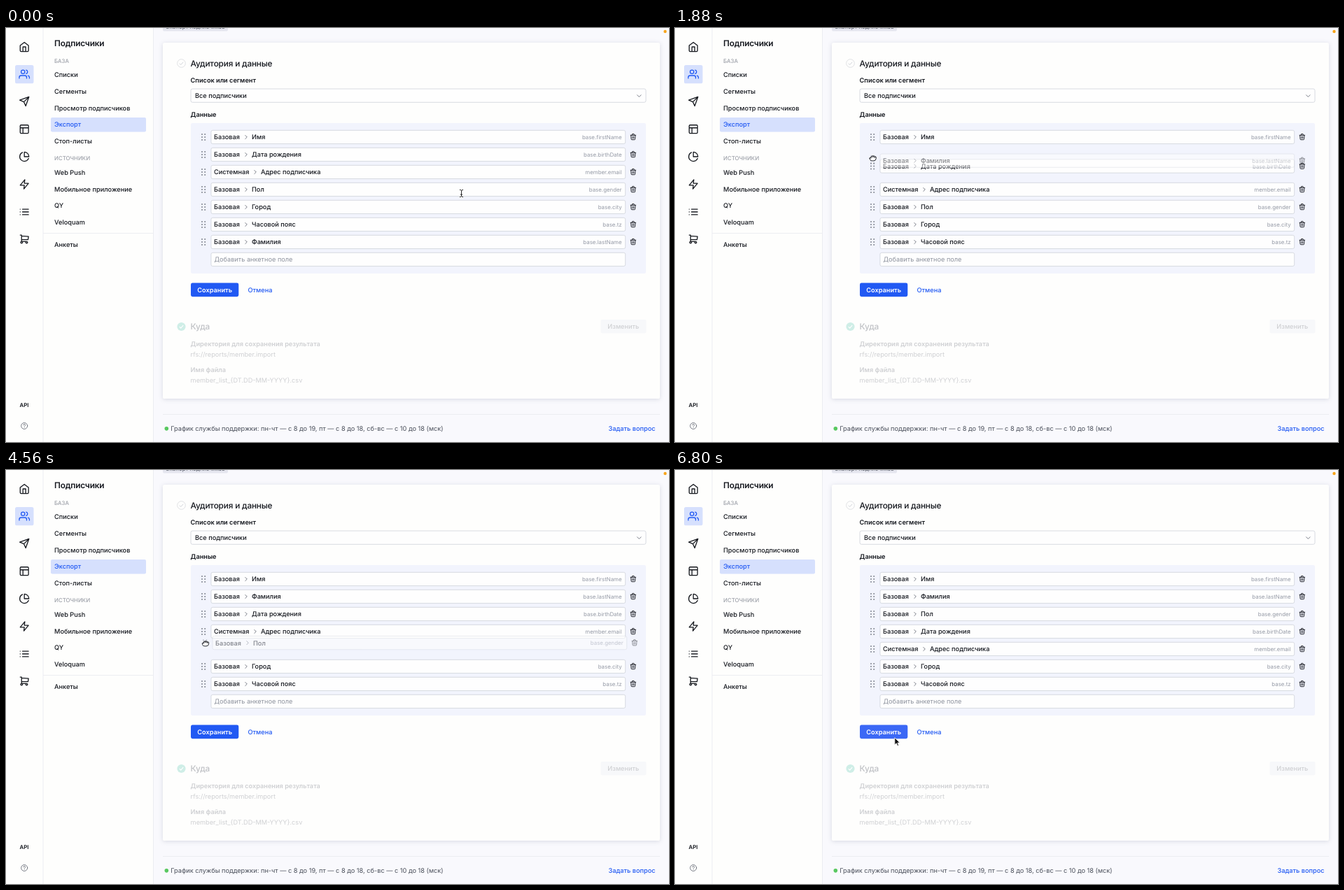
Write an HTML page that moves like this. It is 947 by 592 pixels and loops after 6.84 s.

```html
<!DOCTYPE html>
<html lang="ru">
<head>
<meta charset="utf-8">
<title>Экспорт</title>
<style>
  html, body { margin: 0; width: 100%; height: 100%; overflow: hidden; background: #f9f9fd; }
  svg { display: block; }
  text { font: 450 9.2px Inter, "Noto Sans", sans-serif; fill: #14171e; text-rendering: geometricPrecision; white-space: pre; }
  .h { font-size: 11.84px; font-weight: 500; letter-spacing: -.014em; }
  .title { font-size: 11.84px; font-weight: 600; letter-spacing: -.014em; }
  .b { font-weight: 600; }
  .r { font-weight: 400; }
  .s { font-size: 7.89px; font-weight: 400; fill: #8c909a; }
  .tag { font-size: 7.89px; font-weight: 400; fill: #959aa6; text-anchor: end; }
  .link { fill: #2159f3; }
  .white { fill: #fff; }
  .hint { font-weight: 400; fill: #8f949f; }
  .line { stroke: #e9eaef; stroke-width: .8; }
  .box { fill: #fefefe; stroke: #cfd2da; stroke-width: .8; }
  .icon { fill: none; stroke: #16191f; stroke-width: 2; stroke-linecap: round; stroke-linejoin: round; }
  .thin { fill: none; stroke: #6a6f7a; stroke-width: .9; stroke-linecap: round; stroke-linejoin: round; }
  .dim text { fill: #cfd0d3; }
  .dim .h { fill: #bfc1c5; }
  #card { filter: drop-shadow(0 1px 3px rgba(40, 50, 90, .16)); }
</style>
</head>
<body>
<svg width="947" height="592" viewBox="0 0 947 592">
  <rect width="947" height="592" fill="#f9f9fd"/>
  <rect width="210.5" height="592" fill="#fefefd"/>
  <path class="line" d="M53 0V592M210.5 0V592M53 293.5H210M224 552.5H934"/>

  <rect x="13" y="53" width="26.5" height="26.3" rx="2.6" fill="#d6e0fd"/>
  <g id="menu"></g>
  <text class="b" x="26" y="541.9" text-anchor="middle" style="font-size:7.89px">API</text>
  <circle class="thin" cx="26.2" cy="569" r="4.5"/>
  <path class="thin" d="M24.9 567.8a1.35 1.35 0 1 1 2 1.1q-.7.4-.7 1M26.2 571.3v.01"/>

  <rect x="64" y="128" width="136" height="20.4" rx="2" fill="#d6e0fd"/>
  <text class="title" x="69" y="26.2">Подписчики</text>
  <text class="s" x="69" y="49.9">БАЗА</text>
  <text class="s" x="69" y="189.4">ИСТОЧНИКИ</text>
  <g transform="translate(0 3.35)">
    <text x="69" y="67">Списки</text>
    <text x="69" y="90.7">Сегменты</text>
    <text x="69" y="114.3">Просмотр подписчиков</text>
    <text x="69" y="138" class="link">Экспорт</text>
    <text x="69" y="161.7">Стоп-листы</text>
    <text x="69" y="206.6">Web Push</text>
    <text x="69" y="230.2">Мобильное приложение</text>
    <text x="69" y="253.9">QY</text>
    <text x="69" y="277.6">Veloquam</text>
    <text x="69" y="310">Анкеты</text>
  </g>

  <rect x="224" y="-10" width="93" height="14.5" rx="2.6" fill="#e5e6ef"/>
  <text class="s" x="228" y="1" style="fill:#555a66">Экспорт подписчиков</text>
  <circle cx="941.5" cy="5" r="2.2" fill="#f7a51c"/>

  <rect id="card" x="224" y="21" width="710" height="509" rx="2.6" fill="#fefefd"/>
  <circle cx="250.5" cy="50.5" r="5.8" fill="none" stroke="#d8dade" stroke-width=".8"/>
  <path d="M247.8 50.7l1.9 1.9 3.5-3.9" fill="none" stroke="#d2d5da" stroke-width="1"/>
  <text class="h" x="263.6" y="54.9">Аудитория и данные</text>
  <rect class="box" x="264" y="87" width="650" height="19.3" rx="2.4"/>
  <path class="thin" d="M901.6 95.8l2.7 2.7 2.7-2.7"/>
  <rect x="264" y="136" width="650" height="215" rx="2" fill="#f2f4fd"/>
  <rect class="box" x="292.9" y="321.3" width="591.8" height="19.3" rx="2.4"/>
  <rect id="save" x="264" y="364.6" width="68.3" height="19.6" rx="2.4" fill="#2159f3"/>
  <g transform="translate(0 3.35)">
    <text class="b" x="263.6" y="75">Список или сегмент</text>
    <text x="270" y="96.6">Все подписчики</text>
    <text class="b" x="263.6" y="123.8">Данные</text>
    <text class="hint" x="297.5" y="331">Добавить анкетное поле</text>
    <text class="b white" x="298.2" y="374.2" text-anchor="middle">Сохранить</text>
    <text class="link" x="345.5" y="374.2">Отмена</text>
    <circle cx="229.3" cy="569.5" r="2.8" fill="#58c860"/>
    <text class="r" x="235.3" y="572.8" style="fill:#4a4f5a">График службы поддержки: пн-чт — с 8 до 19, пт — с 8 до 18, сб-вс — с 10 до 18 (мск)</text>
    <text class="link" x="927.5" y="572.6" text-anchor="end">Задать вопрос</text>
  </g>

  <g class="dim">
    <circle cx="250.5" cy="427" r="6.1" fill="#cfeee7"/>
    <path d="M247.8 427.2l1.9 1.9 3.5-3.9" fill="none" stroke="#fff" stroke-width="1.1"/>
    <rect x="849.5" y="417" width="65" height="19.6" rx="2.4" fill="#f7f8fa"/>
    <text class="h" x="263.6" y="431.3">Куда</text>
    <text x="881.8" y="430.2" text-anchor="middle">Изменить</text>
    <text class="b" x="263.6" y="454.6">Директория для сохранения результата</text>
    <text class="r" x="263.6" y="470.4">rfs://reports/member.import</text>
    <text class="b" x="263.6" y="491.6">Имя файла</text>
    <text class="r" x="263.6" y="507.4">member_list_{DT.DD-MM-YYYY}.csv</text>
  </g>

  <g id="rows"></g>

  <g id="cursor">
    <g id="beam" fill="none" stroke-linecap="round">
      <path d="M-2.2-5.2Q0-5.2 0-3.8V3.8Q0 5.2-2.2 5.2M2.2-5.2Q0-5.2 0-3.8M0 3.8Q0 5.2 2.2 5.2M-1.2 1.6H1.2" stroke="#fff" stroke-width="1.9"/>
      <path d="M-2.2-5.2Q0-5.2 0-3.8V3.8Q0 5.2-2.2 5.2M2.2-5.2Q0-5.2 0-3.8M0 3.8Q0 5.2 2.2 5.2M-1.2 1.6H1.2" stroke="#222" stroke-width=".95"/>
    </g>
    <g id="hand" class="icon" transform="scale(.52) translate(-12 -12)">
      <path fill="#fff" d="M6 14V6a2 2 0 0 1 4 0V4a2 2 0 0 1 4 0V6a2 2 0 0 1 4 0V8a2 2 0 0 1 4 0v6a8 8 0 0 1-8 8h-2c-2.8 0-4.5-.86-6-2.34l-3.6-3.6a2 2 0 0 1 2.83-2.82z"/>
      <path d="M10 6v4.5M14 6v4.5M18 8v3"/>
    </g>
    <g id="fist" class="icon" transform="scale(.46) translate(-12 -14)">
      <path fill="#fff" d="M2 14a2 2 0 0 1 4 0V9a2 2 0 0 1 4 0V8a2 2 0 0 1 4 0v1a2 2 0 0 1 4 0v2a2 2 0 0 1 4 0v3a8 8 0 0 1-8 8h-4a8 8 0 0 1-8-8z"/>
      <path d="M10 9v2M14 9v2M18 11v1.5"/>
    </g>
    <path id="arrow" d="M0 0V10.2L2.4 8 4 11.7 5.7 11 4.1 7.3H7.4Z" fill="#111" stroke="#fff" stroke-width=".8"/>
  </g>
</svg>
<script>
const LOOP = 6840, PITCH = 25, TOP = 156;
const $ = id => document.getElementById(id);

// Side menu icons on a 24-unit grid
const ICONS = [
  [27, 'M3 9l9-7 9 7v11a2 2 0 0 1-2 2H5a2 2 0 0 1-2-2zM9 22V12h6v10'],
  [66, 'M17 21v-2a4 4 0 0 0-4-4H5a4 4 0 0 0-4 4v2M5 7a4 4 0 1 0 8 0a4 4 0 1 0-8 0M23 21v-2a4 4 0 0 0-3-3.87M16 3.13a4 4 0 0 1 0 7.75'],
  [105, 'M22 2L11 13M22 2l-7 20-4-9-9-4z'],
  [144.7, 'M5 3h14a2 2 0 0 1 2 2v14a2 2 0 0 1-2 2H5a2 2 0 0 1-2-2V5a2 2 0 0 1 2-2zM3 9h18M9 21V9'],
  [184, 'M21.2 15.9A10 10 0 1 1 8 2.8M22 12A10 10 0 0 0 12 2v10z'],
  [223.5, 'M13 2L3 14h9l-1 8 10-12h-9z'],
  [263, 'M8 6h13M8 12h13M8 18h13M3 6h.01M3 12h.01M3 18h.01'],
  [302, 'M4 19a2 2 0 1 0 4 0a2 2 0 1 0-4 0M15 19a2 2 0 1 0 4 0a2 2 0 1 0-4 0M17 17H6V3H3M6 5l15 1-1 7H6']
];
$('menu').innerHTML = ICONS.map(([y, d], i) =>
  `<path class="icon" transform="translate(26.2 ${y}) scale(.6576) translate(-12 -12)" d="${d}"${i === 1 ? ' style="stroke:#2159f3"' : ''}/>`).join('');

// Slots: position in the list at first, after one drag, after two drags
const ROWS = [
  { name: 'Имя', tag: 'base.firstName', slots: [0, 0, 0] },
  { name: 'Дата рождения', tag: 'base.birthDate', slots: [1, 2, 3] },
  { name: 'Адрес подписчика', tag: 'member.email', slots: [2, 3, 4], system: true },
  { name: 'Город', tag: 'base.city', slots: [4, 5, 5] },
  { name: 'Часовой пояс', tag: 'base.tz', slots: [5, 6, 6] },
  { name: 'Пол', tag: 'base.gender', slots: [3, 4, 2] },
  { name: 'Фамилия', tag: 'base.lastName', slots: [6, 1, 1] }
];
const TRASH = 'M4 7h16M10 11v6M14 11v6M5 7l1 12a2 2 0 0 0 2 2h8a2 2 0 0 0 2-2l1-12M9 7V4a1 1 0 0 1 1-1h4a1 1 0 0 1 1 1v3';
const dots = [280, 284.2].flatMap(x => [-4, 0, 4].map(y => `<circle cx="${x}" cy="${y}" r="1.05" fill="#858a95"/>`)).join('');
$('rows').innerHTML = ROWS.map(({ name, tag, system }) => {
  const x = system ? 364 : 351;
  return `<g>${dots}<rect class="box" x="292.9" y="-9.7" width="591.8" height="19.3" rx="2.4"/>
    <text x="297" y="3.35">${system ? 'Системная' : 'Базовая'}</text>
    <path class="thin" d="M${x - 9.2}-2.5l2.5 2.5-2.5 2.5"/>
    <text x="${x}" y="3.35">${name}</text><text class="tag" x="879.6" y="3.1">${tag}</text>
    <path class="icon" transform="translate(895.8 -.4) scale(.46) translate(-12 -12)" d="${TRASH}"/></g>`;
}).join('');
const rowEls = [...$('rows').children];

const clamp = v => Math.min(1, Math.max(0, v));
const smooth = u => u * u * (3 - 2 * u);
const unsmooth = p => .5 - Math.sin(Math.asin(1 - 2 * p) / 3);

function bezier(x1, y1, x2, y2) {
  const at = (a, b, s) => 3 * a * s * (1 - s) ** 2 + 3 * b * s * s * (1 - s) + s ** 3;
  return x => {
    if (x <= 0 || x >= 1) return clamp(x);
    let lo = 0, hi = 1;
    for (let i = 0; i < 24; i++) {
      const mid = (lo + hi) / 2;
      if (at(x1, x2, mid) < x) lo = mid; else hi = mid;
    }
    return at(y1, y2, lo);
  };
}
const shiftEase = bezier(.2, 0, 0, 1), dropEase = bezier(.2, 1, .1, 1);

// Pointer moves: start, end, target, skew of the easing, sideways bow
const START = [650.5, 236.5];
const MOVES = [
  { t0: 100, t1: 760, to: [282.7, 306], k: 1, bow: 0 },
  { t0: 1360, t1: 2080, to: [282.7, 177.5], k: .535, bow: 0 },
  { t0: 3000, t1: 3740, to: [284.5, 257.6], k: .658, bow: 4.8 },
  { t0: 3740, t1: 3840, to: [283, 257], k: 1, bow: 0 },
  { t0: 4240, t1: 5000, to: [287.3, 201.3], k: 1.6, bow: 2.8 },
  { t0: 6200, t1: 6800, to: [313.8, 382.8], k: 1, bow: 0 }
];
MOVES.forEach((m, i) => m.from = i ? MOVES[i - 1].to : START);

function pointer(t) {
  const m = MOVES.filter(m => t >= m.t0).pop();
  if (!m) return START;
  const p = smooth(clamp((t - m.t0) / (m.t1 - m.t0)) ** m.k);
  const [x0, y0] = m.from, [x1, y1] = m.to;
  return [x0 + (x1 - x0) * p + m.bow * Math.sin(Math.PI * p), y0 + (y1 - y0) * p];
}

const DROP = 350, SHIFT = 200;
const DRAGS = [
  { row: ROWS[6], move: MOVES[1], lag: 3.5, drop: 2260 },
  { row: ROWS[5], move: MOVES[4], lag: 0, drop: 5180 }
];
const slotY = slot => TOP + PITCH * slot;

// When the dragged row comes close enough to push the row at y aside
function pushTime({ row, move, lag }, stage, y) {
  const y0 = move.from[1], dy = y + 14.5 - slotY(row.slots[stage]) - lag;
  return move.t0 + (move.t1 - move.t0) * unsmooth(clamp(dy / (move.to[1] - y0))) ** (1 / move.k);
}

function place(row, t) {
  let x = 0, y = slotY(row.slots[0]), opacity = 1;
  DRAGS.forEach((d, i) => {
    const home = slotY(row.slots[i]), goal = slotY(row.slots[i + 1]);
    if (t < d.move.t0) return;
    if (row !== d.row) {
      if (goal !== home) y = home + (goal - home) * shiftEase((t - pushTime(d, i, home)) / SHIFT);
      return;
    }
    const [px, py] = pointer(Math.min(t, d.drop));
    const dy = Math.min(0, py - d.move.from[1] + d.lag);
    const p = dropEase((t - d.drop) / DROP);
    x = (px - d.move.from[0]) * (1 - p);
    y = home + dy + (goal - home - dy) * p;
    if (dy < 0 && t < d.drop + DROP) opacity = .5;
  });
  return { x, y, opacity };
}

function cursorKind(t, x, y) {
  if (DRAGS.some(d => t > d.move.t0 + 20 && t < d.drop)) return 'fist';
  const inList = y > 146 && y < 341;
  if (inList && x < 292) return 'hand';
  return inList && (y - 146) % PITCH < 19.8 ? 'beam' : 'arrow';
}

function draw(now) {
  const t = now % LOOP;
  ROWS.forEach((row, i) => {
    const { x, y, opacity } = place(row, t);
    rowEls[i].setAttribute('transform', `translate(${x} ${y})`);
    rowEls[i].setAttribute('opacity', opacity);
  });
  const [x, y] = pointer(t), kind = cursorKind(t, x, y);
  for (const id of ['beam', 'hand', 'fist', 'arrow']) $(id).style.display = id === kind ? '' : 'none';
  $('cursor').setAttribute('transform', `translate(${x} ${y})`);
  $('save').setAttribute('fill', y > 364.6 && y < 384.2 ? '#3b68f5' : '#2159f3');
  requestAnimationFrame(draw);
}
draw(performance.now());
</script>
</body>
</html>
```
